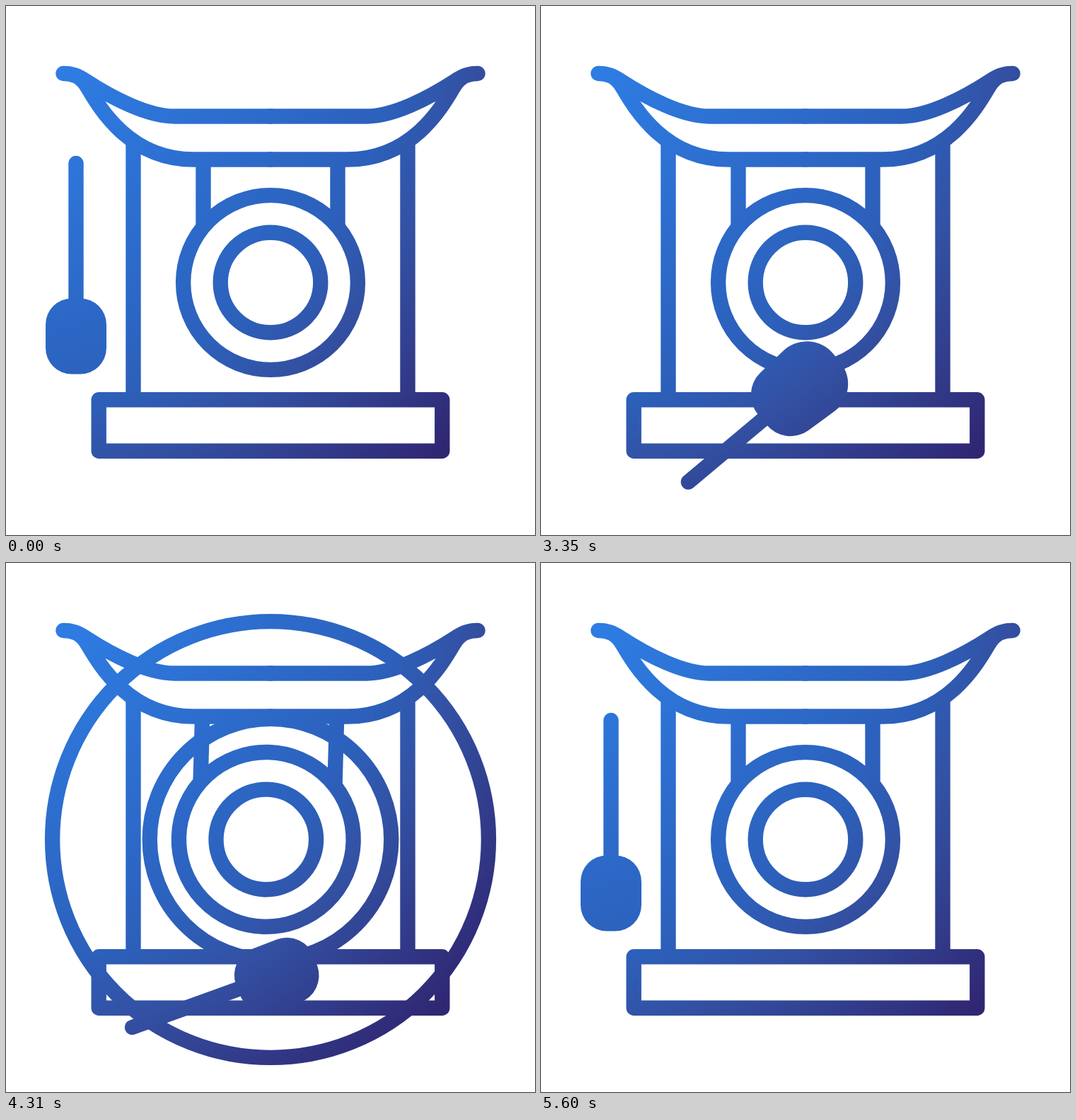
An HTML page with a canvas that plays this animation: 748x748 px, repeating every 5.63 s.

```html
<!DOCTYPE html>
<html lang="en">
<head>
<meta charset="utf-8">
<title>Gong</title>
<style>
  html, body { margin: 0; width: 100%; height: 100%; overflow: hidden; background: #fff; }
  canvas { display: block; width: 748px; height: 748px; }
</style>
</head>
<body>
<canvas id="stage" width="748" height="748"></canvas>
<script>
const ctx = document.getElementById('stage').getContext('2d');
const SIZE = 748, MID = SIZE / 2, TAU = Math.PI * 2, LINE = 21.4;
const LOOP = 5630, STEP = 30, START = 2000, HIT = 3520;
const RIPPLE_TIME = 745, RIPPLE_END = 4340;
const GONG = { y: 391, pivot: 170, outer: 123.4, inner: 70.8, strap: 95 };

// Key poses of the mallet: time, grip x, grip y, angle in degrees, head scale.
const REST = [99, 222.5, 90, 1];
const POSES = [
  [START, ...REST],
  [2750, 165, 661, -7.5, 1.57],
  [3150, 190, 702, -27, 1.55],
  [3660, 229, 617, -54, 0.77],
  [4040, 209, 668, -36.7, 1.03],
  [4700, 133, 610, 10, 1.14],
  [5500, ...REST]
];

const clamp = u => Math.min(1, Math.max(0, u));
const smooth = u => (u = clamp(u), u * u * (3 - 2 * u));

// Rate of change of one value at a pose; zero where it turns or rests.
function slope(i, c) {
  const [p, q, r] = [POSES[i - 1], POSES[i], POSES[i + 1]];
  if (!p || !r) return 0;
  const before = (q[c] - p[c]) / (q[0] - p[0]);
  const after = (r[c] - q[c]) / (r[0] - q[0]);
  return before * after <= 0 ? 0 : 2 * before * after / (before + after);
}

function malletPose(t) {
  const next = POSES.findIndex(pose => pose[0] > t);
  if (next < 1) return REST;
  const a = POSES[next - 1], b = POSES[next];
  const span = b[0] - a[0], u = (t - a[0]) / span;
  return REST.map((_, n) => {
    const c = n + 1;
    const bend = (1 - u) * slope(next - 1, c) - u * slope(next, c);
    return a[c] + (b[c] - a[c]) * smooth(u) + span * u * (1 - u) * bend;
  });
}

function line(x1, y1, x2, y2, cap = 'butt') {
  ctx.lineCap = cap;
  ctx.beginPath();
  ctx.moveTo(x1, y1);
  ctx.lineTo(x2, y2);
  ctx.stroke();
}

function ring(x, y, r) {
  ctx.beginPath();
  ctx.arc(x, y, r, 0, TAU);
  ctx.stroke();
}

// Left half of the roof; the right half mirrors it.
const roofHalf = new Path2D(
  'M81 95.5C93 95 102 99 113 106C150 130 200 156 238 156H375' +
  'M81 95.5C98 95 107 102 114 113C130 140 172 217 265 217H375');

function drawFrame() {
  for (const side of [1, -1]) {
    ctx.save();
    ctx.translate(MID, 0);
    ctx.scale(side, 1);
    ctx.translate(-MID, 0);
    ctx.lineCap = 'round';
    ctx.stroke(roofHalf);
    line(180, 190, 180, 556);
    ctx.restore();
  }
  ctx.strokeRect(131.2, 556.7, 485.6, 72.6);
}

// The blow tips the gong back once, then it sways until it settles.
function drawGong(t) {
  const s = Math.max(0, t - HIT);
  const sway = 0.045 * Math.sin(TAU * s / 680) * (1 - smooth((s - 510) / 830));
  const tip = s < 380 ? 0.055 * Math.sin(Math.PI * s / 380) : 0;
  const y = GONG.y - GONG.pivot;
  ctx.save();
  ctx.translate(MID, GONG.pivot);
  ctx.rotate(sway);
  ctx.scale(1, 1 - tip);
  for (const x of [-GONG.strap, GONG.strap]) line(x, 47, x, 142);
  ring(0, y, GONG.outer);
  ring(0, y, GONG.inner);
  ctx.restore();
}

function drawRipples(t) {
  if (t < HIT || t >= RIPPLE_END) return;
  const p = smooth((t - HIT + 6) / RIPPLE_TIME);
  ring(MID, GONG.y, GONG.outer + 185 * p);
  ring(MID, GONG.y, GONG.inner + 100 * p);
}

// The head widens towards its far end the closer it comes to the viewer.
function drawMallet(t) {
  const [x, y, degrees, scale] = malletPose(t);
  const angle = degrees * TAU / 360;
  const length = 290 - 13 * scale + 21 * Math.max(0, Math.sin(angle));
  const near = length - 107 * scale;
  const taper = 0.3 * (scale - 1);
  const nearHalf = 43 * scale * (1 - taper), farHalf = 43 * scale * (1 + taper);
  const nearRadius = 37 * scale * (1 - Math.max(taper, 0));
  const farRadius = 37 * scale * (1 + taper * 0.3);
  ctx.save();
  ctx.translate(x, y);
  ctx.rotate(angle);
  line(0, 0, near + 10, 0, 'round');
  ctx.beginPath();
  ctx.moveTo(near, 0);
  ctx.arcTo(near, -nearHalf, length, -farHalf, nearRadius);
  ctx.arcTo(length, -farHalf, length, farHalf, farRadius);
  ctx.arcTo(length, farHalf, near, nearHalf, farRadius);
  ctx.arcTo(near, nearHalf, near, 0, nearRadius);
  ctx.fill();
  ctx.restore();
}

// The glow makes one clockwise turn around the stage during the wind-up.
function tint(t) {
  const turn = TAU * (0.623 + smooth((t - START) / 1056));
  const x = MID + 612 * Math.cos(turn), y = MID + 612 * Math.sin(turn);
  const shade = ctx.createRadialGradient(x, y, 150, x, y, 960);
  shade.addColorStop(0, '#2e80e8');
  shade.addColorStop(0.6, '#2c60bb');
  shade.addColorStop(0.72, '#3351a3');
  shade.addColorStop(1, '#302773');
  ctx.globalCompositeOperation = 'source-in';
  ctx.fillStyle = shade;
  ctx.fillRect(0, 0, SIZE, SIZE);
  ctx.globalCompositeOperation = 'destination-over';
  ctx.fillStyle = '#fff';
  ctx.fillRect(0, 0, SIZE, SIZE);
  ctx.globalCompositeOperation = 'source-over';
}

function render(t) {
  ctx.clearRect(0, 0, SIZE, SIZE);
  ctx.fillStyle = ctx.strokeStyle = '#000';
  ctx.lineWidth = LINE;
  ctx.lineJoin = 'round';
  drawFrame();
  drawGong(t);
  drawRipples(t);
  drawMallet(t);
  tint(t);
}

function tick() {
  const t = performance.now() % LOOP;
  const first = START + STEP;
  render(t < first ? 0 : t - (t - first) % STEP);
  requestAnimationFrame(tick);
}
tick();
</script>
</body>
</html>
```
